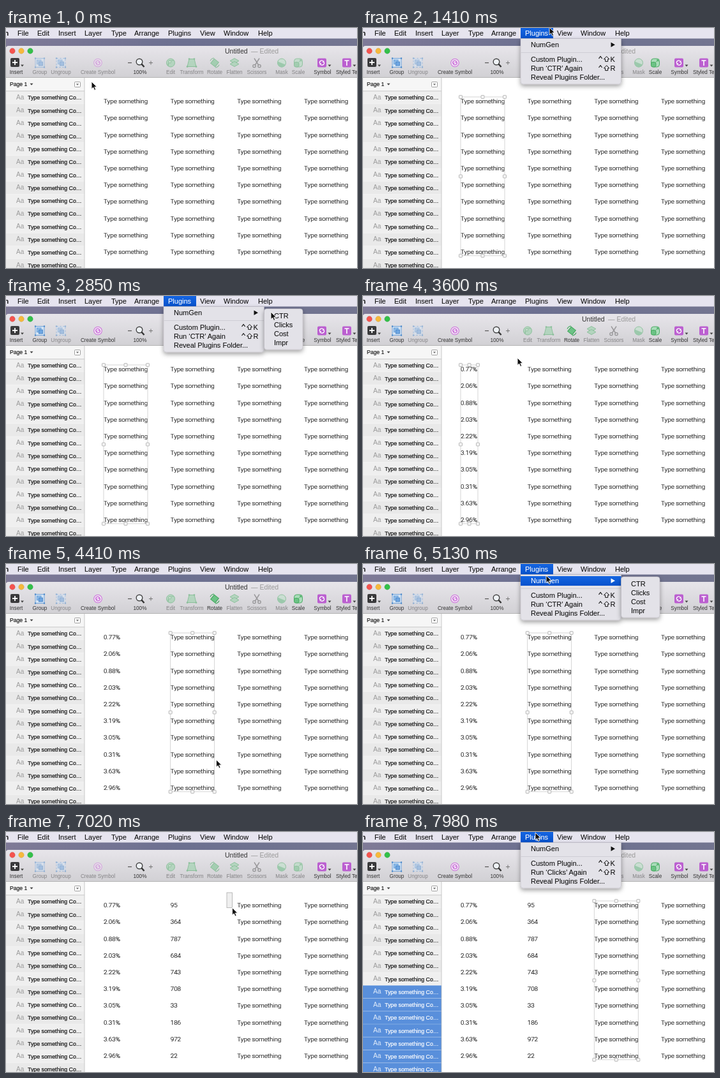
Write an HTML page that moves like this. It is 550x376 px and loops after 8 s.

```html
<!DOCTYPE html>
<html lang="en">
<head>
<meta charset="utf-8">
<title>Number generator</title>
<style>
html, body { margin: 0; width: 100%; height: 100%; overflow: hidden; background: #fff; }
svg { display: block; width: 550px; height: 376px; }
text { font-family: "Liberation Sans", Arial, sans-serif; white-space: pre; }
.cell { font: 300 9.85px Roboto, sans-serif; fill: #111; stroke: #111; stroke-width: .2px; }
</style>
</head>
<body>
<svg id="stage" viewBox="0 0 550 376" xmlns="http://www.w3.org/2000/svg">
  <defs>
    <linearGradient id="bar" x2="0" y2="1"><stop stop-color="#e7e5ea"/><stop offset="1" stop-color="#d1d0d4"/></linearGradient>
    <linearGradient id="desk"><stop stop-color="#7f7a97"/><stop offset=".5" stop-color="#6c7090"/><stop offset="1" stop-color="#737590"/></linearGradient>
    <linearGradient id="blue" x2="0" y2="1"><stop stop-color="#1565e2"/><stop offset="1" stop-color="#0752cc"/></linearGradient>
    <filter id="shadow" x="-20%" y="-20%" width="140%" height="160%"><feDropShadow dx="0" dy="3" stdDeviation="3.5" flood-opacity=".38"/></filter>
  </defs>
</svg>
<script>
const NS = "http://www.w3.org/2000/svg";
const LOOP = 8000;
const stage = document.getElementById("stage");

function add(parent, tag, attrs = {}, content) {
  const el = document.createElementNS(NS, tag);
  for (const k in attrs) el.setAttribute(k, attrs[k]);
  if (content !== undefined) el.textContent = content;
  parent.appendChild(el);
  return el;
}
const set = (el, attrs) => { for (const k in attrs) el.setAttribute(k, attrs[k]); };
const rect = (p, x, y, width, height, fill, more) => add(p, "rect", { x, y, width, height, fill, ...more });
const path = (p, d, fill = "none", more) => add(p, "path", { d, fill, ...more });
const label = (p, x, y, size, str, fill = "#111", more) =>
  add(p, "text", { x, y, "font-size": size, fill, ...more }, str);
const show = (el, on) => el.setAttribute("visibility", on ? "visible" : "hidden");
const group = (p = stage) => add(p, "g");

// Window, title and toolbar
rect(stage, 0, 0, 550, 376, "#fff");
rect(stage, 0, 16, 550, 14, "url(#desk)");
path(stage, "M0 78V32Q0 28 4 28H550V78Z", "url(#bar)");
path(stage, "M0 77.5H550", "none", { stroke: "#b4b4b4" });
["#f4544f", "#f6b93c", "#34c04a"].forEach((fill, i) =>
  add(stage, "circle", { cx: 10 + 14 * i, cy: 36, r: 4.4, fill, stroke: "#0002", "stroke-width": .6 }));
label(stage, 343, 40, 10.5, "Untitled", "#333");
label(stage, 384, 40, 10.5, "— Edited", "#999");

const tools = {};
function tool(name, x, draw) {
  const g = tools[name] = group();
  if (name) label(g, x, 72, 8.2, name, "#333", { "text-anchor": "middle" });
  const icon = add(g, "g", { transform: `translate(${x} 54.5)` });
  draw(icon);
  return g;
}
const caret = (p, x, y) => path(p, `M${x - 2.5} ${y}h5l-2.5 3z`, "#444");
const line = (p, d, stroke, w = 1.2) => path(p, d, "none", { stroke, "stroke-width": w });
const GREEN = "#3fa65a", LEAF = "#8dd0a0", PURPLE = "#bb5fd0", BLUE = "#5b96d6";

function boxes(g, split) {
  rect(g, -7, -7, 14, 14, "#d3e3f3", { stroke: BLUE, "stroke-width": .8, "stroke-dasharray": split ? "3 2" : "none" });
  rect(g, -4.5, -4.5, 6.5, 6.5, "#93bfea", { stroke: BLUE, "stroke-width": .8 });
  rect(g, -1.5, -1.5, 6, 6, "#6ea6e2", { stroke: "#4580c2", "stroke-width": .8 });
  for (const x of [-7, 7]) for (const y of [-7, 7]) rect(g, x - 1.1, y - 1.1, 2.2, 2.2, "#4a88ca");
}
function cycle(g, color, r) {
  line(g, `M${-r} 1A${r} ${r} 0 0 1 ${r * .7} ${-r * .7}M${r} -1A${r} ${r} 0 0 1 ${-r * .7} ${r * .7}`, color);
  path(g, `M${r} ${-r}v3h-3zM${-r} ${r}v-3h3z`, color);
}

tool("Insert", 16, g => {
  rect(g, -9, -7.5, 14, 14, "#3a3a3c", { rx: 2 });
  line(g, "M-2 -4.5v8M-6 -.5h8", "#fff", 1.8);
  caret(g, 9.5, 3);
});
tool("Group", 53, g => boxes(g, false));
tool("Ungroup", 86, g => boxes(g, true));
tool("Create Symbol", 144, g => {
  add(g, "circle", { r: 6.3, fill: "#f1e2f4", stroke: "#cc74da", "stroke-width": 1.1 });
  cycle(g, "#c968d8", 3);
});
tool("100%", 210, g => {
  add(g, "circle", { cx: -1, cy: -1.5, r: 4.8, fill: "#eef2f6", stroke: "#444", "stroke-width": 1.4 });
  line(g, "M2.5 2l4 4.5", "#333", 2.4);
  line(g, "M-19 0h6", "#555", 1.2);
  line(g, "M14 0h6M17 -3v6", "#777", 1);
});
tool("Edit", 258, g => {
  add(g, "circle", { r: 6.5, fill: LEAF, stroke: GREEN });
  line(g, "M-4 5C-4 -2 1 -4 5 -4", GREEN);
  rect(g, -2.8, -3, 3, 3, "#fff", { stroke: GREEN });
});
tool("Transform", 291, g => {
  path(g, "M-4 -6H4L7 6H-7Z", LEAF, { stroke: GREEN });
  for (const [x, y] of [[-4, -6], [4, -6], [7, 6], [-7, 6]]) rect(g, x - 1.2, y - 1.2, 2.4, 2.4, GREEN);
});
tool("Rotate", 327, g => {
  rect(g, -4.5, -4.5, 9, 9, "#6cc285", { stroke: GREEN, transform: "rotate(38)" });
  line(g, "M-7 -3A7.5 7.5 0 0 1 -1 -7.5M7 3A7.5 7.5 0 0 1 1 7.5", GREEN);
});
tool("Flatten", 358, g => {
  path(g, "M0 -7L7 -3L0 1L-7 -3Z", LEAF, { stroke: GREEN });
  path(g, "M-7 2L0 6L7 2L0 -2Z", LEAF, { stroke: GREEN });
});
tool("Scissors", 393, g => {
  line(g, "M-4 -7L3 4M4 -7L-3 4", "#555", 1.4);
  for (const cx of [-4, 4]) add(g, "circle", { cx, cy: 5, r: 2.2, fill: "none", stroke: "#555", "stroke-width": 1.3 });
});
tool("Mask", 432, g => {
  add(g, "circle", { r: 6.5, fill: "#b9e2c6", stroke: GREEN });
  path(g, "M-6 -2A6.5 6.5 0 0 0 6 3Z", "#5fba7c");
});
tool("Scale", 458, g => {
  rect(g, -6.5, -6.5, 13, 13, "#aadcba", { rx: 4, stroke: GREEN, "stroke-width": .9 });
  rect(g, -6.5, -1, 7.5, 7.5, "#6cc285", { rx: 2.5, stroke: GREEN, "stroke-width": .9 });
  line(g, "M1 -1L4.5 -4.5M2 -4.5H4.5V-2", GREEN, 1);
});
tool("Symbol", 496, g => {
  rect(g, -8, -7, 14, 14, PURPLE, { rx: 2 });
  const c = add(g, "g", { transform: "translate(-1 0)" });
  cycle(c, "#fff", 3.4);
  caret(g, 11, 3);
});
tool("", 535, g => {
  rect(g, -8, -7, 14, 14, PURPLE, { rx: 2 });
  line(g, "M-4.5 -3.5h7M-1 -3.5v8", "#fff", 1.6);
  caret(g, 11, 3);
});
label(stage, 517, 72, 8.2, "Styled Text", "#333");
const onSelect = ["Group", "Create Symbol", "Rotate", "Scale"];
for (const n of ["Ungroup", "Edit", "Transform", "Flatten", "Scissors", "Mask"]) tools[n].setAttribute("opacity", .5);

// Layer list
rect(stage, 0, 78, 123, 298, "#f0f0f0");
rect(stage, 0, 78, 123, 21, "#f6f6f6");
label(stage, 6, 91.2, 8.6, "Page 1", "#111", { stroke: "#111", "stroke-width": .15 });
caret(stage, 40, 86.8);
rect(stage, 107.5, 84.5, 9, 8, "#fff", { rx: 1, stroke: "#888", "stroke-width": .8 });
path(stage, "M109.8 87.3h4.4l-2.2 2.6z", "#777");
const layers = [...Array(14).keys()].map(i => {
  const y = 98.7 + 20.23 * i;
  const bg = rect(stage, 0, y, 123, 20.23, "#fff");
  path(stage, `M0 ${y}H123`, "none", { stroke: "#fff", "stroke-opacity": .35, "stroke-width": .7 });
  const icon = label(stage, 16, y + 13, 10, "Aa");
  const name = label(stage, 34, y + 13.6, 8.8, "Type something Co…", "#111", { "stroke-width": .2 });
  return { bg, icon, name, plain: i % 2 ? "#e9e9e9" : "#efefef" };
});
path(stage, "M0 98.8H123M123 78V376", "none", { stroke: "#bdbdbd", "stroke-width": .8 });

// Canvas text
const colX = [153, 257.7, 362.3, 467];
const rowY = r => 118.1 + 26.2 * r;
const results = [
  "0.77% 2.06% 0.88% 2.03% 2.22% 3.19% 3.05% 0.31% 3.63% 2.96%".split(" "),
  "95 364 787 684 743 708 33 186 972 22".split(" ")
];
const changeAt = [3150, 6680];
const cells = colX.map(x => [...Array(10).keys()].map(r =>
  add(stage, "text", { x, y: rowY(r), class: "cell" }, "Type something")));

const marquee = rect(stage, 0, 0, 0, 0, "#8a8a8a22", { stroke: "#aaa", "stroke-width": .8 });
const selection = group();
const frame = rect(selection, 0, 0, 0, 0, "none", { stroke: "#cacaca", "stroke-width": .8 });
const handles = [...Array(8)].map(() =>
  rect(selection, 0, 0, 5, 5, "#f4f4f4", { rx: .8, stroke: "#aaa", "stroke-width": .8 }));

// Menu bar
rect(stage, 0, 0, 550, 16.5, "#e6e4ef");
label(stage, -2.5, 12, 11, "n", "#111", { "font-weight": 700 });
const plugHi = rect(stage, 247, 0, 51, 16.5, "url(#blue)");
const titles = { File: 18, Edit: 49, Insert: 82, Layer: 123, Type: 165, Arrange: 201, Plugins: 254, View: 304, Window: 341, Help: 395 };
const menuText = (p, x, y, s) => label(p, x, y, 11, s, "#111", { "stroke-width": .15, stroke: "currentColor", "stroke-opacity": .5 });
const plugins = Object.entries(titles).map(([s, x]) => menuText(stage, x, 11.8, s))[6];

const PANEL = "#e3e2e8", EDGE = { stroke: "#b4b3bb", "stroke-width": .5, filter: "url(#shadow)" };
const menu = group();
path(menu, "M247 16.5H404.5V84Q404.5 88 400.5 88H251Q247 88 247 84Z", PANEL, EDGE);
const genHi = rect(menu, 247, 19, 157.5, 15, "url(#blue)");
const gen = menuText(menu, 263, 29.6, "NumGen");
const arrow = path(menu, "M388.5 22.5v7.4l6.5-3.7z");
path(menu, "M247 38.5H404.5", "none", { stroke: "#cfced5", "stroke-width": 1.2 });
menuText(menu, 263, 52.8, "Custom Plugin...");
const run = menuText(menu, 263, 67, "");
menuText(menu, 263, 81.2, "Reveal Plugins Folder...");
[["K", 48.8], ["R", 63]].forEach(([key, y]) => {
  line(menu, `M369.5 ${y - 1}l2.6-3.4 2.6 3.4`, "#111", 1.1);
  line(menu, `M377.5 ${y}l4.2-4.3 4.2 4.3h-2.2v3.6h-4v-3.6z`, "#111", 1);
  menuText(menu, 387.5, y + 4, key);
});

const sub = group();
rect(sub, 404.5, 20, 60.5, 64, PANEL, { rx: 4, ...EDGE });
const subHi = rect(sub, 404.5, 0, 60.5, 14.3, "url(#blue)");
const subItems = ["CTR", "Clicks", "Cost", "Impr"].map((s, i) => menuText(sub, 420, 34.7 + 14.1 * i, s));

const cursor = path(stage, "M0 0V11.6L2.7 9.1L4.6 13.4L6.7 12.5L4.8 8.3H8.4Z", "#111", { stroke: "#fff", "stroke-width": .9 });

// Pointer stops: time, x, y
const stops = [
  [0, 134, 84], [120, 137, 92], [720, 237, 366], [840, 238, 362], [1350, 292, -1], [1440, 292, -1],
  [1700, 290, 22], [2350, 398, 26], [2560, 415, 26], [2850, 415, 25], [3100, 412, 27],
  [3600, 242, 97], [3680, 243, 97], [4180, 338, 366], [4300, 338, 364], [4740, 284, 3], [4900, 284, 3],
  [5130, 287, 18], [5670, 396, 27], [5850, 415, 29], [6000, 415, 31], [6200, 415, 41], [6400, 415, 41],
  [6870, 346, 95], [6930, 346, 95], [7430, 443, 366], [7500, 443, 364], [7770, 271, 3], [7980, 270, 1], [8000, 270, 1]
];
const drags = [[120, 720], [3680, 4180], [6930, 7430]];
const menus = [
  { open: 1380, sub: 1800, blink: 2820, close: 2970 },
  { open: 4770, sub: 5040, blink: 6370, close: 6500 },
  { open: 7800, sub: Infinity, blink: Infinity, close: Infinity }
];
const FADE = 150;

function pointer(t) {
  const i = Math.max(1, stops.findIndex(s => s[0] > t));
  const [a, b] = [stops[i - 1], stops[i]];
  const u = (t - a[0]) / (b[0] - a[0]);
  const k = u * u * (3 - 2 * u);
  return [a[1] + (b[1] - a[1]) * k, a[2] + (b[2] - a[2]) * k];
}

function drawSelection(t, x, y) {
  const col = drags.findLastIndex(d => t >= d[0]);
  const active = col >= 0;
  const [from, to] = active ? drags[col] : [0, 0];
  const dragging = active && t < to;
  let count = active ? 10 : 0;
  show(marquee, dragging);
  if (dragging) {
    const [sx, sy] = pointer(from);
    set(marquee, { x: sx, y: sy, width: Math.max(0, x - sx), height: Math.max(0, y - sy) });
    count = x < colX[col] ? 0 : Math.max(0, Math.min(10, Math.ceil((y - 108) / 26.2)));
  }
  show(selection, count > 0);
  if (count) {
    const left = colX[col], top = 108;
    const w = t < (changeAt[col] ?? Infinity) ? 69 : col ? 17 : 27;
    const h = 13 + 26.2 * (count - 1);
    set(frame, { x: left, y: top, width: w, height: h });
    let n = 0;
    for (const i of [0, .5, 1]) for (const j of [0, .5, 1])
      if (i !== .5 || j !== .5) set(handles[n++], { x: left + w * i - 2.5, y: top + h * j - 2.5 });
  }
  for (const name of onSelect) tools[name].setAttribute("opacity", count ? 1 : .5);
  layers.forEach((l, i) => {
    const on = col === 2 && i >= 7 && 16 - i < count;
    set(l.bg, { fill: on ? "#598fdb" : l.plain });
    set(l.icon, { fill: on ? "#e4eefb" : "#9a9a9a" });
    set(l.name, { fill: on ? "#fff" : "#111", stroke: on ? "#fff" : "#111" });
  });
}

function drawMenus(t, x, y) {
  const m = menus.find(m => t >= m.open && t < m.close + FADE);
  const opacity = m ? Math.min(1, 1 - (t - m.close) / FADE) : 0;
  const subOn = !!m && t >= m.sub;
  const lit = !!m && !(t >= m.blink && t < m.blink + 80);
  const held = !!m && t >= m.blink;
  const genOn = lit && (subOn || (y >= 17.5 && y < 36));
  const pick = held ? menus.indexOf(m) : x > 405 ? Math.floor((y - 24) / 14.2) : -1;
  const ink = (el, on) => set(el, { fill: on ? "#fff" : "#111", color: on ? "#fff" : "#111" });

  show(menu, !!m);
  show(sub, subOn);
  set(menu, { opacity });
  set(sub, { opacity });
  const plugOn = !!m && t < m.close;
  set(plugHi, { opacity: +plugOn });
  ink(plugins, plugOn);
  set(genHi, { opacity: +genOn });
  ink(gen, genOn);
  ink(arrow, genOn);
  set(subHi, { opacity: +(lit && pick >= 0), y: 24 + 14.1 * Math.max(0, pick) });
  subItems.forEach((el, i) => ink(el, lit && i === pick));
  run.textContent = t < 6700 ? "Run ‘CTR’ Again" : "Run ‘Clicks’ Again";
}

function draw(t) {
  const [x, y] = pointer(t);
  results.forEach((values, c) => cells[c].forEach((el, r) => {
    el.textContent = t < changeAt[c] ? "Type something" : values[r];
  }));
  drawSelection(t, x, y);
  drawMenus(t, x, y);
  set(cursor, { transform: `translate(${x} ${y})` });
}

const start = performance.now();
function tick() {
  draw((performance.now() - start) % LOOP);
  requestAnimationFrame(tick);
}
tick();
</script>
</body>
</html>
```
